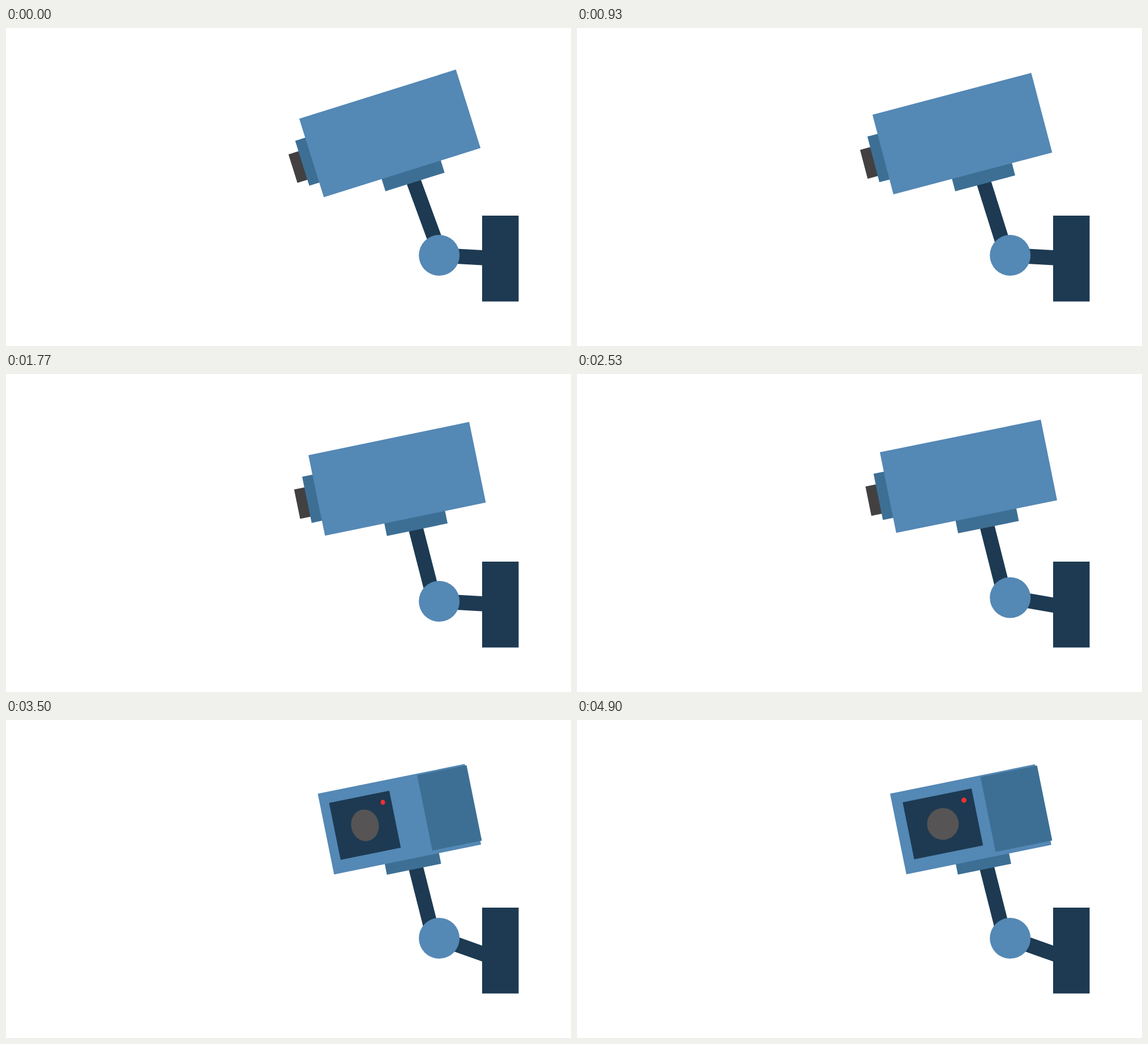
These frames come from a looping animation (998x561 px, 5360 ms). An HTML page:

```html
<!DOCTYPE html>
<html lang="en">
<head>
<meta charset="utf-8">
<title>Security camera</title>
<style>
  html, body { margin: 0; width: 100%; height: 100%; overflow: hidden; background: #fff; }
  svg { display: block; width: 100%; height: 100%; }
  .light { fill: #5488b5; }
  .mid { fill: #3d6f95; }
  .dark { fill: #1d3a52; }
</style>
</head>
<body>
<svg viewBox="0 0 998 561">
  <rect id="strut" class="dark" y="-13.25" width="95" height="26.5"/>
  <rect class="dark" x="841" y="331" width="64.5" height="151.5"/>
  <g id="camera">
    <rect class="dark" x="146.8" y="160" width="26" height="137" transform="rotate(-2.75 159.8 167.6)"/>
    <rect id="base" class="mid"/>
    <rect id="barrel" fill="#434041"/>
    <rect id="plate" class="mid"/>
    <rect id="body" class="light"/>
    <rect id="side" class="mid"/>
    <g id="face">
      <rect class="dark" x="36.7" y="21.5" width="124.1" height="102.6"/>
      <circle cx="98.8" cy="72.9" r="28" fill="#565454"/>
      <circle id="flash" cx="98.8" cy="72.9" r="25.8" fill="#fff"/>
      <circle id="lamp" cx="143.5" cy="39.3" r="4.5" fill="#f03035"/>
    </g>
  </g>
  <circle id="joint" class="light" cx="765.2" r="36"/>
</svg>
<script>
const LOOP = 5360;
const $ = id => document.getElementById(id);
const clamp = p => Math.min(1, Math.max(0, p));
const ease = p => p < 0.5 ? 4 * p ** 3 : 1 - 4 * (1 - p) ** 3;
const lerp = (a, b, p) => a + (b - a) * p;
const set = (id, attrs) => {
  for (const k in attrs) $(id).setAttribute(k, attrs[k]);
};

// camera poses: x, y, angle
const poses = [
  [518, 160, -17.4],
  [522.3, 152.4, -14.5],
  [535, 142.5, -11.45],
  [535, 131.5, -11.45]
];
const moves = [[565, 1070], [1395, 1900], [2295, 2800]];
const turn = [3135, 3670];

// x, y, width, height seen from the side and from the front
const parts = {
  base: [[107, 140, 109.5, 27.6], [107, 140, 96, 25.8]],
  barrel: [[-37, 54.3, 20, 52.7], [30, 54.3, 20, 52.7]],
  plate: [[-18.5, 35, 20, 83.2], [30, 35, 20, 83.2]],
  body: [[0, 0, 290, 145.2], [17.9, 2, 261.3, 145.2]],
  side: [[290, 2, 0, 141], [180.3, 4.8, 102, 135]]
};

const progress = (t, [from, to]) => ease(clamp((t - from) / (to - from)));

function draw(t) {
  let pose = poses[0];
  moves.forEach((m, i) => {
    const p = progress(t, m);
    pose = pose.map((v, k) => lerp(v, poses[i + 1][k], p));
  });
  const [x, y, angle] = pose;
  set('camera', { transform: `translate(${x} ${y}) rotate(${angle})` });

  const lift = progress(t, moves[2]);
  const jointY = lerp(401, 385, lift);
  set('joint', { cy: jointY });
  set('strut', { transform: `translate(765.2 ${jointY}) rotate(${lerp(3.2, 19.6, lift)})` });

  const p = progress(t, turn);
  for (const id in parts) {
    const [a, b] = parts[id];
    const [x, y, width, height] = a.map((v, i) => lerp(v, b[i], p));
    set(id, { x, y, width, height });
  }
  set('face', {
    transform: `scale(${p} 1)`,
    visibility: p > 0 ? 'visible' : 'hidden'
  });

  set('flash', { opacity: t < 4300 ? 0 : 1 - clamp((t - 4310) / 520) });
  set('lamp', { opacity: Math.abs(1 - 2 * clamp((t - 4310) / 590)) });
}

function tick() {
  draw(performance.now() % LOOP);
  requestAnimationFrame(tick);
}
tick();
</script>
</body>
</html>
```
